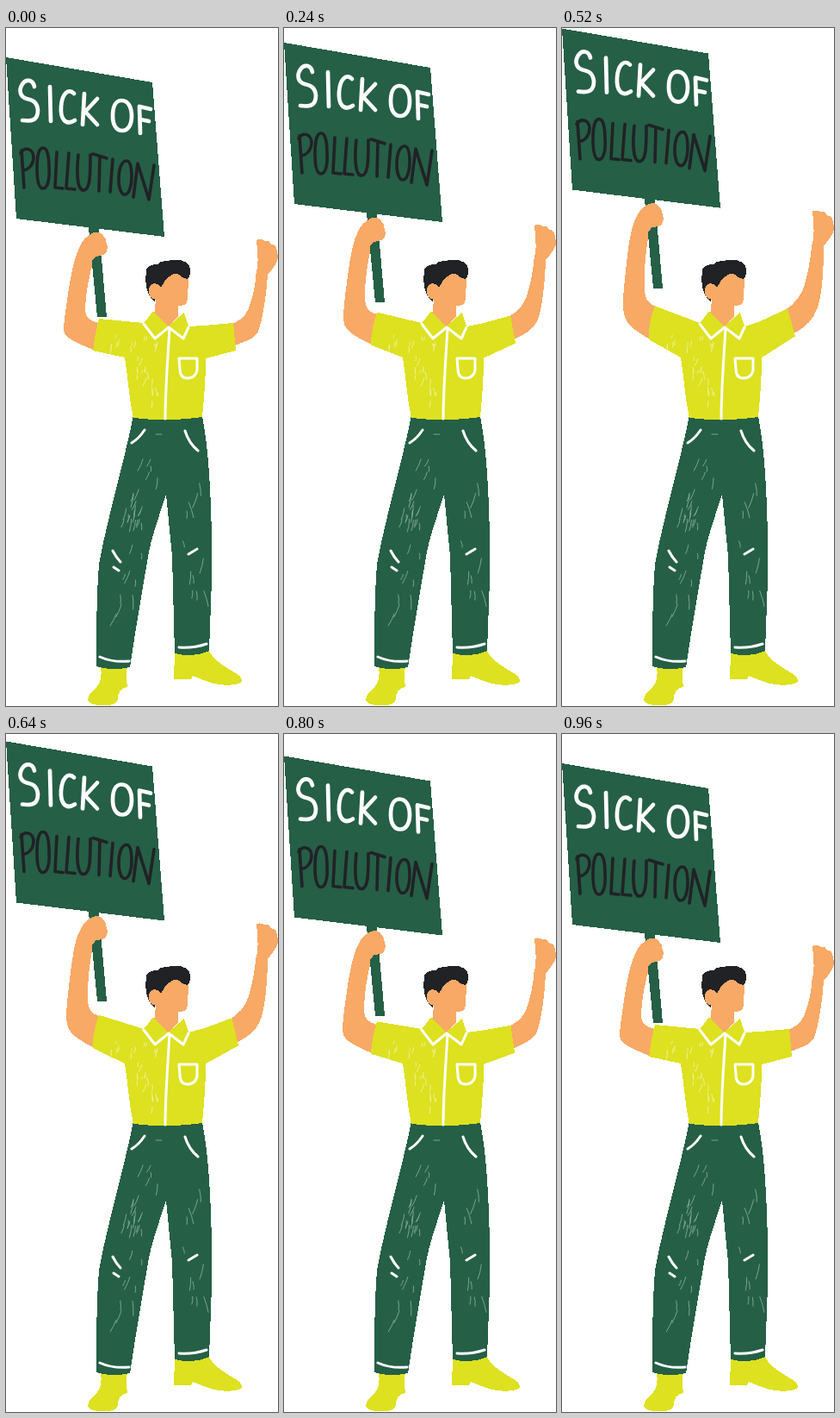
Write an HTML page that moves like this. It is 316 px wide and 786 px high and loops after 1 s.

```html
<!DOCTYPE html>
<html lang="en">
<head>
<meta charset="utf-8">
<title>Protester</title>
<style>
  html, body { margin: 0; width: 100%; height: 100%; overflow: hidden; background: #fff; }
  svg { display: block; width: 316px; height: 786px; }
  .green { fill: #255f46; }
  .lime { fill: #dde120; }
  .skin { fill: #f8a966; }
  .dark { fill: #202226; }
  .green, .lime, .skin, .dark { shape-rendering: crispEdges; }
  .line { fill: none; stroke: #fff; stroke-width: 3; stroke-linecap: round; stroke-linejoin: round; }
  .word { fill: none; stroke-linecap: round; stroke-linejoin: round; }
  .grain { fill: none; stroke-width: .9; stroke-linecap: round; }
</style>
</head>
<body>
<svg viewBox="0 0 316 786" role="img" aria-label="A man holding up a sign: SICK OF POLLUTION">
  <!-- shoes and trousers -->
  <path class="lime" d="M110 740L141 740C139 749 140 756 141 764C133 765 130 770 130 778C128 785 119 786 110 785C100 785 95 782 95 778C96 770 104 768 108 760C111 754 111 748 110 740Z"/>
  <path class="lime" d="M196 724L235 720C240 733 254 740 265 747C273 751 275 755 273 759C265 763 250 762 242 760C232 757 224 754 217 751L215 755L195 755Z"/>
  <path class="green" d="M148 449L228 450C236 490 240 560 239 640L236 722C224 728 207 728 196 725L193 612L186 541C175 574 168 594 165 613C157 660 150 700 144 741C131 744 117 744 105 740C105 700 105 660 108 621C118 568 138 500 148 449Z"/>
  <path class="grain" id="legGrain" stroke="#86ab98"/>
  <path class="line" d="M161 466C157 472 151 478 146 481M208 467C211 477 217 485 223 490M124 606C127 612 130 616 133 619M125 625L131 629M212 610L222 604M109 729C120 734 132 735 143 734M201 718C212 719 224 717 233 714"/>

  <!-- arms -->
  <path class="skin" id="armL"/>
  <path class="skin" id="armR"/>

  <!-- shirt -->
  <path class="lime" id="shirt"/>
  <path class="grain" id="shirtGrain" stroke="#f1f3a4"/>
  <path class="line" d="M190 348C188 382 185 420 185 453"/>
  <path class="line" d="M201 383L222 383L222 395C222 402 217 406 211 406C205 406 202 402 202 395Z"/>

  <!-- head -->
  <path class="dark" d="M173 317C163 311 161 294 163 283C161 277 168 274 176 274C180 269 187 271 193 269C204 268 214 271 214 280C214 287 213 292 208 291L190 304L176 304Z"/>
  <path class="skin" d="M180 301C186 288 196 282 201 286C205 290 210 292 212 290L211 315C210 322 205 322 200 322L200 334L188 347L172 334L174 315C168 314 165 309 166 303C167 296 175 293 180 301Z"/>
  <path class="lime" d="M160 343L171 328L189 347L173 360ZM189 347L207 330L212 347L206 360Z"/>
  <path class="line" d="M160 343L173 360L189 347L206 360L212 347"/>

  <!-- sign and gripping hand -->
  <g id="sign">
    <path class="green" d="M95 222L107 222L117 335L106 335Z"/>
    <path class="green" d="M0 34L170 63L184 242L12 221Z"/>
    <g class="word" stroke="#fff" stroke-width="4.7">
      <path d="M33 68C31 59 23 59 19 65C14 73 17 80 24 82C33 84 36 87 37 95C37 105 33 109 19 107"/>
      <path d="M51 68L52 108"/>
      <path d="M79 76C72 69 65 77 64 91C63 105 69 114 80 107"/>
      <path d="M91 76L89 112M106 82L92 97L106 112"/>
      <path d="M134 84C127 84 124 92 124 102C124 112 128 119 135 119C142 119 146 112 146 102C146 92 142 84 134 84Z"/>
      <path d="M155 91L156 122M155 91L168 94M156 106L166 108"/>
    </g>
    <g class="word" stroke="#202226" stroke-width="3.6">
      <path d="M18 142L21 185M17 145C22 137 31 140 32 149C32 158 27 164 20 165"/>
      <path d="M43 139C38 139 36 149 36 162C36 176 38 186 43 186C48 186 51 176 50 162C50 149 48 139 43 139Z"/>
      <path d="M59 144L57 185L66 186"/>
      <path d="M73 145L70 186L80 187"/>
      <path d="M84 147C82 165 82 188 90 188C98 188 98 169 98 147"/>
      <path d="M101 146L117 151M109 149L108 189"/>
      <path d="M124 152L121 190"/>
      <path d="M140 154C134 154 131 164 131 175C131 186 134 193 138 193C143 193 146 183 146 173C146 163 145 154 140 154Z"/>
      <path d="M148 196L153 157L166 199L172 159"/>
    </g>
    <path class="skin" d="M86 253C89 246 94 241 100 238C106 235 111 237 113 241C117 244 116 248 117 251C119 255 117 258 116 261C113 264 108 264 104 265L101 269L84 270Z"/>
  </g>
  <path class="skin" id="fist" d="M291 246C294 244 298 245 301 247C305 245 307 249 308 251C313 250 315 256 315 260C317 265 316 270 313 274C310 279 307 283 304 286L291 283C294 271 292 258 291 246Z"/>
</svg>
<script>
const LOOP = 1000, STEP = 40, SWING = 960, LIFT = 34;
const el = id => document.getElementById(id);

// Outlines with the arms lowered and raised
const poses = {
  armL: [
    "M86 253C78 268 74 295 70 322C68 338 66 348 68 354C71 361 87 367 104 374L115 374L114 343L108 342C98 340 92 336 92 327C92 308 97 286 102 268Z",
    "M86 219C78 235 76 264 73 291C71 309 70 325 73 335C77 347 90 353 104 362L115 362L114 326L108 322C100 319 96 314 96 302C95 286 97 254 102 234Z"
  ],
  armR: [
    "M291 280C290 297 287 313 281 327C277 336 270 340 260 344L260 370L266 368C278 363 287 361 292 354C298 341 303 306 304 284Z",
    "M291 246C289 264 286 283 282 297C278 310 271 319 259 327L259 357L271 353C284 346 292 337 296 326C303 309 304 276 304 250Z"
  ],
  shirt: [
    "M108 337L160 342L171 329L188 346L207 330L212 346L230 345L264 342L267 374L232 383C232 407 230 430 228 451C203 455 172 455 148 452C143 433 142 405 138 382L101 374C102 361 105 349 108 337Z",
    "M108 322L160 342L171 329L188 346L207 330L212 346L230 340L262 325L271 357L232 382C232 407 230 430 228 451C203 455 172 455 148 452C143 433 142 405 138 382L101 361C100 348 103 335 108 322Z"
  ]
};

function morph(pair, k) {
  const high = pair[1].match(/\d+/g);
  let i = 0;
  return pair[0].replace(/\d+/g, n => (+n + (high[i++] - n) * k).toFixed(2));
}

let seed = 7;
const rnd = (a, b) => {
  seed = (seed * 16807) % 2147483647;
  return a + (b - a) * seed / 2147483647;
};

// Short strokes scattered in a slanted band
function grain(count, top, bottom, x0, x1, slant, len) {
  let d = "";
  for (let i = 0; i < count; i++) {
    const y = rnd(top, bottom), x = rnd(x0, x1) + (y - top) * slant;
    const h = rnd(len / 3, len), w = h * (slant + rnd(-.4, .3));
    d += `M${x.toFixed(1)} ${y.toFixed(1)}q${(w / 2 + 1).toFixed(1)} ${(h / 2).toFixed(1)} ${w.toFixed(1)} ${h.toFixed(1)}`;
  }
  return d;
}

el("legGrain").setAttribute("d", "M174 471L181 471" +
  grain(18, 515, 575, 147, 168, -.2, 16) +
  grain(14, 485, 680, 162, 184, -.2, 18) +
  grain(11, 520, 670, 203, 231, .02, 18));
el("shirtGrain").setAttribute("d",
  grain(14, 355, 370, 122, 180, -.1, 8) +
  grain(16, 370, 435, 152, 182, -.1, 9));

function draw(now) {
  const t = Math.floor(now % LOOP / STEP) * STEP;
  const k = (1 - Math.cos(2 * Math.PI * t / SWING)) / 2;
  for (const id in poses) el(id).setAttribute("d", morph(poses[id], k));
  const shift = `translate(0 ${(-LIFT * k).toFixed(2)})`;
  el("sign").setAttribute("transform", shift);
  el("fist").setAttribute("transform", shift);
}

const start = performance.now();
function tick() {
  draw(performance.now() - start);
  requestAnimationFrame(tick);
}
tick();
</script>
</body>
</html>
```
